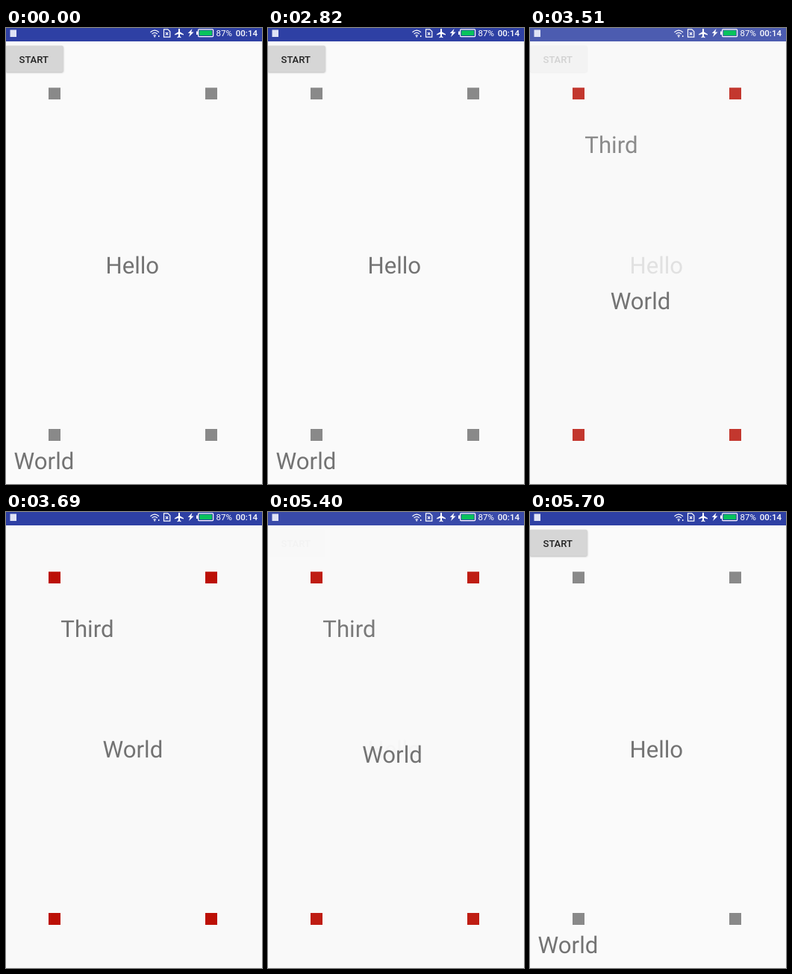
Animation, 343 px wide and 613 px high, one loop 7.92 s. Source, as an HTML page:

```html
<!DOCTYPE html>
<html lang="en">
<head>
<meta charset="utf-8">
<style>
  html, body { margin: 0; width: 100%; height: 100%; overflow: hidden; background: #fafafa; }
  svg { display: block; font-family: Roboto, sans-serif; }
  .label { font-size: 31.2px; fill: #737373; text-rendering: geometricPrecision; }
  .small { font-size: 11.5px; fill: #fff; }
  .bold { font-weight: 500; }
  .line { fill: none; stroke: #fff; stroke-width: 1.2; }
  .button { filter: drop-shadow(0 1px 1px #0004); }
</style>
</head>
<body>
<svg width="343" height="613" viewBox="0 0 343 613">
  <defs>
    <rect id="bar" width="343" height="18" fill="#2e40a4"/>
    <path id="squares" d="M57 80.3h16v15.8h-16zM267 80.3h16v15.8h-16zM57 539h16v16h-16zM267 539h16v16h-16z"/>
  </defs>
  <rect id="back" width="343" height="613"/>

  <g id="first">
    <use href="#bar"/>
    <rect class="button" x="-0.5" y="23.7" width="77.3" height="35.3" rx="2" fill="#d6d6d6"/>
    <text class="bold" x="17.6" y="46.6" font-size="13" fill="#212121">START</text>
    <use href="#squares" fill="#898989"/>
    <text class="label" x="133.4" y="330">Hello</text>
  </g>

  <g id="second">
    <use href="#bar"/>
    <use href="#squares" fill="#bc1006"/>
    <text class="label" x="73.3" y="168">Third</text>
  </g>

  <text id="world" class="label">World</text>

  <g id="status" fill="#fff">
    <rect x="5.5" y="2.5" width="8.5" height="9.5" fill="#dfe3f5"/>
    <g class="line">
      <path d="M193.5 5.7q5.7-5 11.4 0M195.6 8q3.6-3.2 7.2 0M197.6 10.2q1.6-1.4 3.2 0"/>
      <path d="M211.5 1.8h5.3l3 3v7.4h-8.3zM213.9 5.8l3.4 3.6m0-3.6l-3.4 3.6"/>
      <rect x="257.6" y="1.8" width="20" height="9.8" rx="1"/>
    </g>
    <circle cx="199.2" cy="11.4" r="1"/>
    <path d="M204 10h1.4v2h-1.4z"/>
    <path d="M231 1.5q1-1.6 2 0v3.7l5 3v1.4l-5-1.5v3l1.5 1.1v1l-2.5-.7-2.5.7v-1l1.5-1.1v-3l-5 1.5v-1.4l5-3z"/>
    <path d="M249.5 1l-5.7 6h3l-1.8 5 6.5-6.5h-3.3z"/>
    <path d="M255 4.5h1.8v4.4h-1.8z"/>
    <rect x="259.3" y="3.4" width="16.7" height="6.6" fill="#08c35c"/>
    <text class="small" x="281.6" y="11">87%</text>
    <text class="small bold" x="307.8" y="11">00:14</text>
  </g>
</svg>
<script>
  const LOOP = 7920, STEP = 30;
  const el = id => document.getElementById(id);
  const mix = (a, b, p) => a + (b - a) * p;

  // accelerate, then decelerate
  const ease = (t, start, length) => {
    const u = Math.min(1, Math.max(0, (t - start) / length));
    return (1 - Math.cos(Math.PI * u)) / 2;
  };

  function draw(now) {
    const t = Math.floor((now % LOOP) / STEP) * STEP;
    const enter = ease(t, 3314, 273);
    const p = enter - ease(t, 5371, 270);
    const shown = enter - ease(t, 5360, 270);
    const tone = mix(250, 249, p);

    el("back").setAttribute("fill", `rgb(${tone},${tone},${tone})`);
    el("first").setAttribute("opacity", 1 - p);
    el("second").setAttribute("opacity", shown);
    el("world").setAttribute("x", mix(10.6, 129.5, p));
    el("world").setAttribute("y", mix(593, 330, p));
  }

  const origin = performance.now();
  function frame() {
    draw(performance.now() - origin);
    requestAnimationFrame(frame);
  }
  frame();
</script>
</body>
</html>
```
